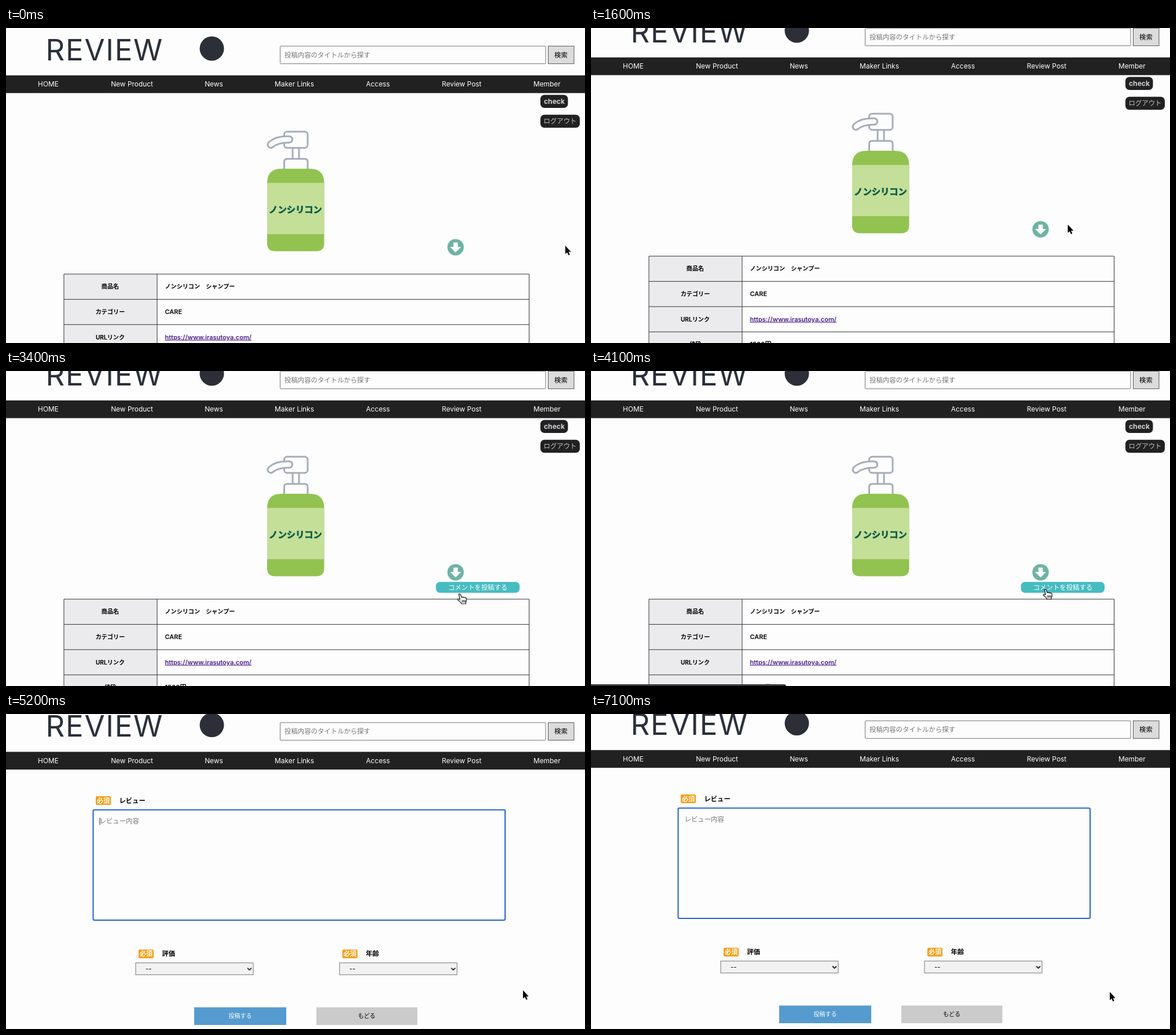
These frames come from a looping animation (1000 px wide and 544 px high, 7.2 s). An HTML page:

```html
<!DOCTYPE html>
<html lang="ja">
<head>
<meta charset="utf-8">
<title>REVIEW</title>
<style>
  html, body { margin: 0; width: 100%; height: 100%; overflow: hidden; background: #fdfdfd; }
  svg { display: block; width: 1000px; height: 544px; }
  text { font: 11.4px Inter, "Noto Sans CJK JP", "Noto Sans CJK", sans-serif; white-space: pre; }
  .mid { text-anchor: middle; }
  .logo { font-size: 51px; letter-spacing: 1.7px; fill: #2b303a; }
  .nav text { font-size: 11.9px; fill: #fff; text-anchor: middle; }
  .hint { fill: #757575; }
  .field { fill: #fdfdfd; stroke: #767676; }
  .dark { fill: #212121; }
  .cell { font-size: 10.1px; font-weight: 700; }
  .latin { font-size: 11px; font-weight: 600; }
  .link { fill: #4b1a86; text-decoration: underline; }
  .label { font-size: 11.3px; font-weight: 700; }
  .pump { fill: #fdfdfd; stroke: #a5adb9; stroke-width: 3; stroke-linejoin: round; }
  .bottle { font-size: 15.3px; font-weight: 900; fill: #0d5b47; stroke: #0d5b47; stroke-width: .7; }
</style>
</head>
<body>
<svg viewBox="0 0 1000 544">
  <g id="page">
    <text class="logo" x="68.5" y="55.5">REVIEW</text>
    <circle cx="355.5" cy="35.5" r="21" fill="#2c2f37"/>
    <rect class="field" x="473.5" y="31.3" width="458.5" height="30.4" rx="1"/>
    <text class="hint" x="481" y="50.8">投稿内容のタイトルから探す</text>
    <rect x="936.5" y="31.3" width="44.5" height="30.4" fill="#dcdcdc" stroke="#555"/>
    <text class="mid" x="958.5" y="50.8">検索</text>
    <rect class="dark" y="81.8" width="1000" height="30.6"/>
    <g class="nav" id="nav"></g>

    <g id="product">
      <rect class="dark" x="923" y="115.5" width="47.5" height="22.5" rx="7"/>
      <text class="mid" x="947" y="131" style="font-size:12.1px;font-weight:700" fill="#cfcfd6">check</text>
      <rect class="dark" x="923" y="149.8" width="68" height="22.5" rx="7"/>
      <text class="mid" x="957" y="165" fill="#c4c4c8">ログアウト</text>

      <g class="pump">
        <rect x="495" y="205" width="11" height="24"/>
        <rect x="480.5" y="179" width="40.5" height="28" rx="5"/>
        <path d="M480.5 245V231q0-5 5-5h30.500q5 0 5 5v14z"/>
        <path d="M489 187q-23-1-35 10-4 5 0 8.500 3 3 7 0 10-8 28-7.500 5.500-.500 5.500-5.500 0-5-5.500-5.500z"/>
      </g>
      <path fill="#92c350" d="M451 268q0-25 25-25h48.500q25 0 25 25v104q0 13.500-14 13.500h-70.500q-14 0-14-13.500z"/>
      <rect x="451" y="267.5" width="98.500" height="88.500" fill="#c4df98"/>
      <text class="bottle mid" x="500" y="318.5">ノンシリコン</text>

      <circle cx="776.5" cy="378.6" r="14.2" fill="#6fb3a5"/>
      <path d="M772.700 370.500h7.600v7.500h5.700l-9.500 9.500-9.500-9.500h5.700z" fill="#fff"/>
      <g id="tip">
        <rect x="742.5" y="395.2" width="144.500" height="18.800" rx="7" fill="#46bcc1"/>
        <text class="mid" x="815" y="408.8" fill="#fff">コメントを投稿する</text>
      </g>

      <rect x="100" y="425" width="161" height="180" fill="#ebebee"/>
      <path d="M100 605V425H903.500V605M261 425V605M100 468.600H903.500M100 512.200H903.500M100 555.800H903.500" fill="none" stroke="#333"/>
      <g id="rows"></g>
    </g>

    <g id="form">
      <rect x="150.500" y="182" width="711.500" height="190.500" rx="2" fill="#fdfdfd" stroke="#2462cf" stroke-width="2"/>
      <text class="hint" x="161.500" y="205.800">レビュー内容</text>
      <path id="caret" d="M162 195.500v12.500" stroke="#222"/>
      <g id="fields"></g>
      <rect x="325" y="523" width="159" height="30.500" fill="#559bcf"/>
      <text class="mid" x="404.500" y="541.500" style="font-size:10px" fill="#fff">投稿する</text>
      <rect x="536" y="523" width="174.500" height="30.500" fill="#cbcbcb"/>
      <text class="mid" x="623" y="541.500" style="font-size:10px">もどる</text>
    </g>
  </g>

  <path id="status" d="M0 541H333q4 0 4 3H0z" fill="#36383c"/>
  <g id="cursor">
    <path id="arrow" d="M0 0V14.300l3.200-2.900 2.300 5 2.300-1-2.200-4.800h4.200z" stroke="#fff" stroke-width="1.400" paint-order="stroke"/>
    <path id="hand" fill="#fff" stroke="#111" stroke-width="1.200" stroke-linejoin="round"
      d="M-2 .5q1.500-1.500 3 .5l2 5q2-1.500 3 .3 2-1.200 2.800.5 2-.8 2.300 1.200 .6 4-1 6.500v2.500h-7.500q-1-3-6.500-7 0-2 2-1.500l2 1z M4 10.500v4M6.300 10.500v4M8.600 10.500v4"/>
  </g>
</svg>
<script>
const $ = id => document.getElementById(id);
const text = (x, y, str, cls = '') => `<text x="${x}" y="${y}" class="${cls}">${str}</text>`;

$('nav').innerHTML = [
  [73, 'HOME'], [217.5, 'New Product'], [359, 'News'], [498, 'Maker Links'],
  [642.5, 'Access'], [787, 'Review Post'], [934.3, 'Member']
].map(([x, name]) => text(x, 101.3, name)).join('');

$('rows').innerHTML = [
  ['商品名', 'ノンシリコン　シャンプー', 'cell'],
  ['カテゴリー', 'CARE', 'latin'],
  ['URLリンク', 'https://www.irasutoya.com/', 'latin link'],
  ['値段', '1500円', 'latin']
].map(([name, value, cls], i) => {
  const y = 450.4 + i * 43.6;
  return text(180, y, name, 'cell mid') + text(274.5, y, value, cls);
}).join('');

const label = (x, y, name) =>
  `<rect x="${x}" y="${y}" width="26" height="15" rx="2" fill="#f69d13"/>` +
  `<text x="${x + 13}" y="${y + 11.6}" class="label mid" fill="#fff">必須</text>` +
  text(x + 40.5, y + 11.6, name, 'label');
const select = (x, name) => label(x + 5.5, 423.3, name) +
  `<rect class="field" x="${x + .5}" y="446.2" width="203" height="20.500" style="fill:#f2f2f3"/>` +
  text(x + 17.5, 460.5, '--') +
  `<path d="M${x + 193.5} 455l3.500 3.500 3.500-3.500" fill="none" stroke="#222" stroke-width="1.800"/>`;
$('fields').innerHTML = label(155, 158.5, 'レビュー') + select(223.5, '評価') + select(575.5, '年齢');

const LOOP = 7200, STEP = 100, SUBMIT = 4150;
const pointer = [
  [0, 966, 376], [500, 966, 376], [1200, 879, 330], [2000, 768, 349], [2500, 768, 349],
  [3100, 784, 385], [3500, 784, 385], [4000, 785, 377], [4300, 785, 377], [5300, 896, 480], [LOOP, 896, 480]
];

const ease = (t, from, to) => {
  const k = Math.min(1, Math.max(0, (t - from) / (to - from)));
  return k * k * (3 - 2 * k);
};
const show = (id, on) => $(id).style.display = on ? '' : 'none';

function pointerAt(t) {
  const i = pointer.findIndex(p => p[0] > t);
  const [t0, x0, y0] = pointer[i - 1], [t1, x1, y1] = pointer[i];
  const k = ease(t, t0, t1);
  return [x0 + (x1 - x0) * k, y0 + (y1 - y0) * k];
}

function draw(now) {
  const t = Math.floor(now % LOOP / STEP) * STEP;
  const onForm = t > SUBMIT, hand = t >= 2900 && t < 4400;
  const scroll = onForm ? 19.5 * ease(t, 4900, 5300) : 31 * ease(t, 1100, 1600);
  $('page').setAttribute('transform', `translate(0 ${-scroll})`);
  $('cursor').setAttribute('transform', `translate(${pointerAt(t)})`);
  show('product', !onForm);
  show('form', onForm);
  show('tip', t >= 1900);
  show('caret', Math.floor((t - SUBMIT) / 500) % 2 === 0);
  show('status', t >= 3600 && t < 4900);
  show('hand', hand);
  show('arrow', !hand);
  requestAnimationFrame(draw);
}
requestAnimationFrame(draw);
</script>
</body>
</html>
```
